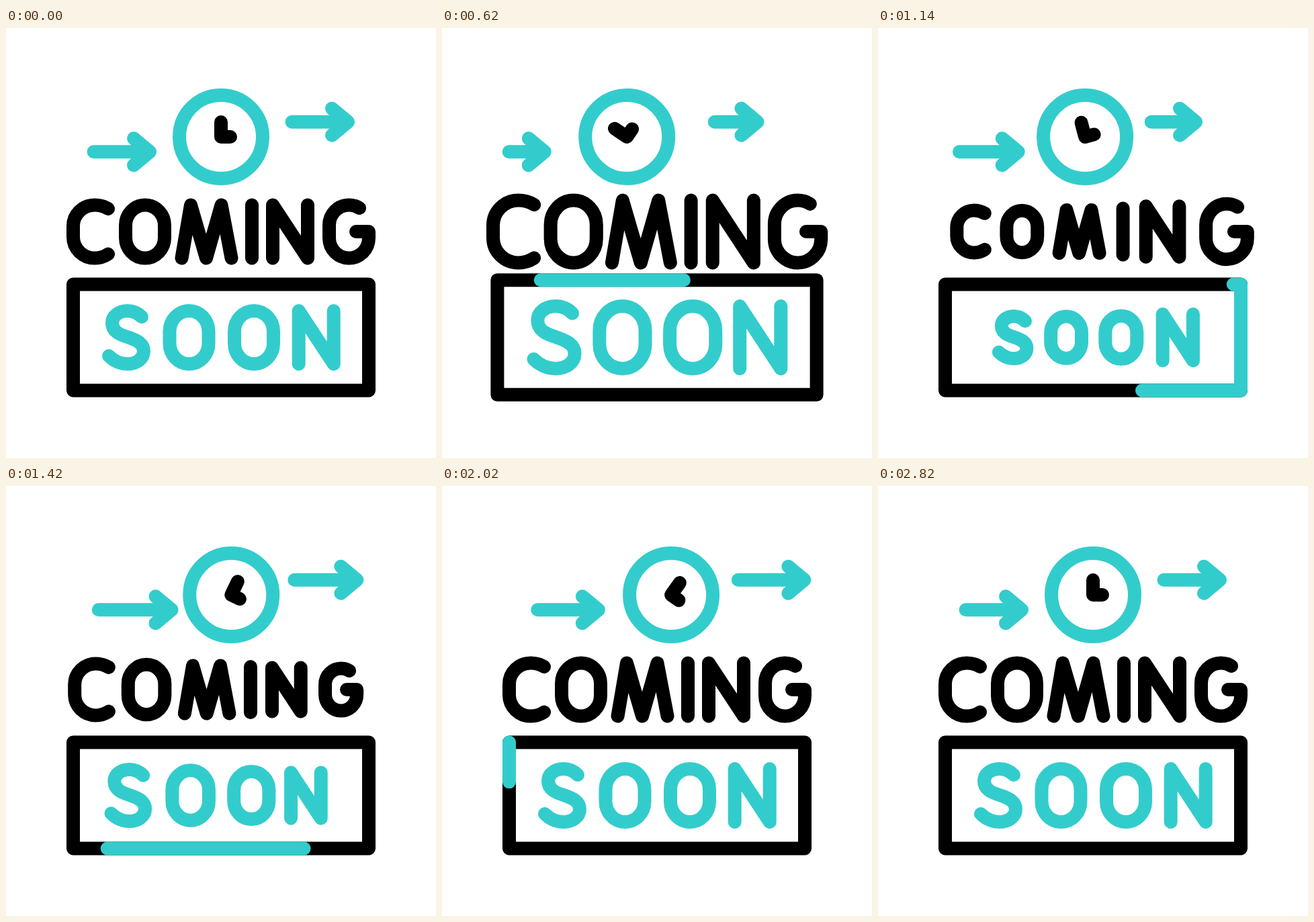
An HTML page that plays this animation: 640 px wide and 640 px high, repeating every 3220 ms.

```html
<!DOCTYPE html>
<html lang="en">
<head>
<meta charset="utf-8">
<title>Coming soon</title>
<style>
html, body { margin: 0; width: 100%; height: 100%; overflow: hidden; background: #fff; }
svg { display: block; width: 100%; height: 100%; }
path, circle { fill: none; stroke: #000; stroke-width: 20; stroke-linecap: round; stroke-linejoin: round; vector-effect: non-scaling-stroke; }
.teal { stroke: #33cccc; }
</style>
</head>
<body>
<svg viewBox="0 0 640 640">
  <path id="arrow1" class="teal"/>
  <path id="arrow2" class="teal"/>
  <g id="clock">
    <circle class="teal" cx="320" cy="162" r="62"/>
    <path id="hands" d="M320 140V162H334"/>
  </g>
  <g id="letters"></g>
  <path id="box"/>
  <path id="runner" class="teal" pathLength="1196"/>
</svg>
<script>
const LOOP = 3220, STAGGER = 56, MID = 320, PERIMETER = 1196;
const $ = id => document.getElementById(id);
const set = (el, attrs) => Object.entries(attrs).forEach(([k, v]) => el.setAttribute(k, v));

// Sine-eased 0..1 between two times
function ramp(t, from, to) {
  const p = Math.min(1, Math.max(0, (t - from) / (to - from)));
  return (1 - Math.cos(Math.PI * p)) / 2;
}

// Starts at 0 and eases through [time, value] stops
function ease(t, ...stops) {
  let value = 0, time = 0;
  for (const [end, next] of stops) {
    value += (next - value) * ramp(t, time, end);
    time = end;
  }
  return value;
}

// Drift left, shoot right, rebound, settle
const swing = (t, left, right, rebound) => ease(t, left, right, [2350, rebound], [2800, 0]);

// Swell, hold, shrink, settle
const pulse = (t, up, down) => ease(t, [330, up], [715, up], [1085, down], [1520, 0]);

// Letter strokes around their own centre
const glyphs = {
  C: 'M26 -34Q17 -39.5 6 -39.5A32 31.5 0 0 0 -26 -8V8A32 31.5 0 0 0 6 39.5Q17 39.5 26 33.5',
  O: 'M-29 -9a29 30.5 0 0 1 58 0v18a29 30.5 0 0 1 -58 0z',
  M: 'M-36.5 39.5L-23 -39.5L0 39.5L22.5 -39.5L37.5 39.5',
  I: 'M0 -39.5V39.5',
  N: 'M-26 39.5V-39.5L26 39.5V-39.5',
  G: 'M15.5 -35Q9 -39.5 0 -39.5A29.5 30 0 0 0 -29.5 -9.5V9.5A29.5 30 0 0 0 29.5 9.5V0H10.5',
  S: 'M23 -30.5Q14 -39.5 2 -39.5C-11 -39.5 -21 -32 -21 -21.5C-21 -9.5 -11 -4.5 2 -.5C17 4.5 26 9.5 26 20.5C26 32 15 39.5 2 39.5Q-14 39.5 -26 27.5'
};

const words = [
  { text: 'COMING', y: 303, centres: [126, 207, 298, 366, 423, 510.5], out: 0.1, inward: -0.065, color: '' },
  { text: 'SOON', y: 460.5, centres: [179, 272.5, 369, 461.7], out: 0.085, inward: -0.16, color: 'teal' }
];

const letters = words.flatMap(word => [...word.text].map((char, i) => {
  const el = document.createElementNS('http://www.w3.org/2000/svg', 'path');
  set(el, { d: glyphs[char], class: word.color });
  $('letters').append(el);
  return { el, word, cx: word.centres[i], delay: i * STAGGER };
}));

function drawLetter({ el, word, cx, delay }, time) {
  const t = time - delay;
  const x = cx + (cx - MID) * pulse(t, word.out, word.inward);
  const scale = 1 + pulse(t, 0.175, -0.21);
  set(el, { transform: `translate(${x} ${word.y}) scale(${scale})` });
}

function drawArrow(id, tail, tip, y) {
  set($(id), { d: `M${tail} ${y}H${tip}m-24 -20l24 20l-24 20` });
}

function drawBox(t) {
  const s = 1 + ease(t, [600, 0.08], [1080, 0.08], [1130, 0]);
  const w = 220 * s, h = 79 * s;
  const d = `M${MID - w} ${460.5 - h}h${2 * w}v${2 * h}h${-2 * w}z`;
  const head = PERIMETER * ramp(t, 35, 1945);
  const tail = PERIMETER * ramp(t, 340, 2300);
  set($('box'), { d });
  set($('runner'), {
    d,
    'stroke-dasharray': `${head - tail} ${2 * PERIMETER}`,
    'stroke-dashoffset': -tail,
    visibility: head - tail > 0.5 ? 'visible' : 'hidden'
  });
}

function draw(t) {
  drawArrow('arrow1',
    130.5 + swing(t, [580, -31], [1800, 18], 0),
    214 + swing(t, [560, -62], [1700, 48], -11.5), 184.3);
  drawArrow('arrow2',
    425.5 + swing(t, [920, -26], [1800, 23], 1),
    509 + swing(t, [920, -52], [1780, 52], -5), 139.7);

  const x = swing(t, [580, -45], [1850, 36], -21);
  set($('clock'), { transform: `translate(${x})` });
  set($('hands'), { transform: `rotate(${x * (x > 0 ? 1.69 : 1.25)} 320 162)` });

  letters.forEach(letter => drawLetter(letter, t));
  drawBox(t);
}

const start = performance.now();
function tick() {
  draw((performance.now() - start) % LOOP);
  requestAnimationFrame(tick);
}
tick();
</script>
</body>
</html>
```
